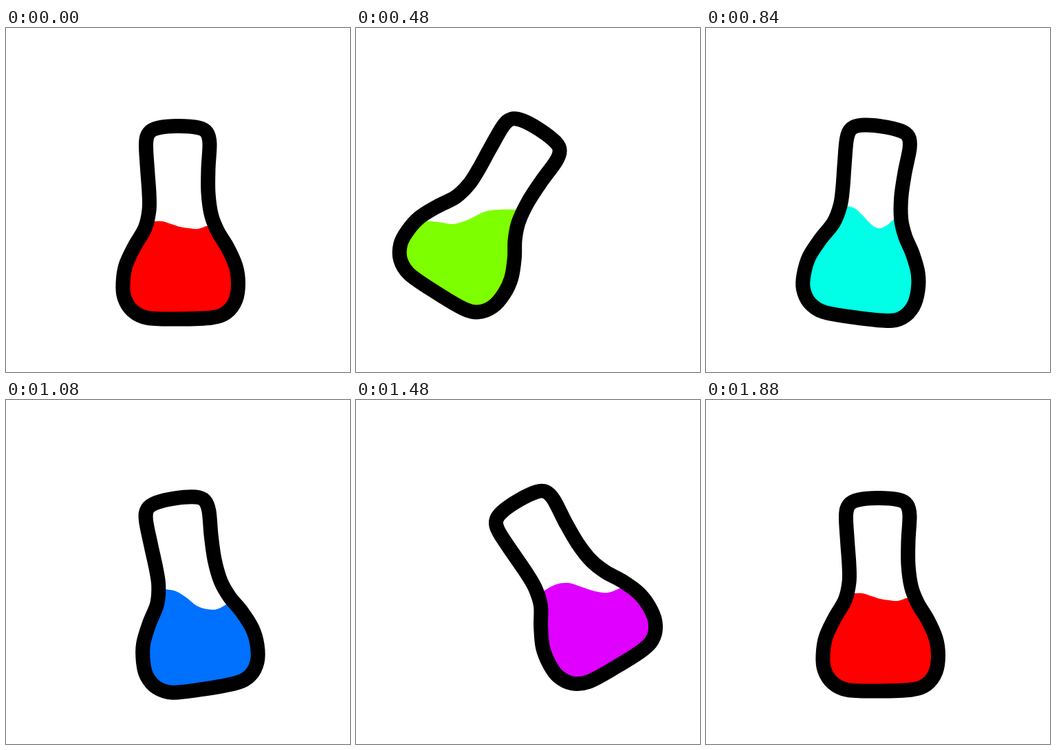
Recreate the animation shown at these times as an HTML page with a canvas. Size 500 by 500 pixels, loop 1920 ms.

```html
<!DOCTYPE html>
<html lang="en">
<head>
<meta charset="utf-8">
<title>Swinging flask</title>
<style>
  html, body { margin: 0; width: 100%; height: 100%; overflow: hidden; background: #fff; }
  canvas { display: block; width: 500px; height: 500px; }
</style>
</head>
<body>
<canvas id="stage" width="500" height="500"></canvas>
<script>
const ctx = document.getElementById('stage').getContext('2d');
const STEP = 40, STEPS = 48;
const PIVOT = { x: 250, y: 172 };

// Centre line of the glass, clockwise from the top left
const OUTLINE = [
  [222, 145], [250, 142.5], [280, 145], [292, 152], [296, 168], [294, 205],
  [294, 240], [298.5, 272], [308, 296], [322, 319], [334, 346], [337.5, 371],
  [334, 395], [321, 413], [299, 421], [250, 423], [206, 421.5], [184, 411],
  [172, 392], [170, 371], [174, 345], [187, 317], [202, 291], [208, 265],
  [208, 240], [205.5, 205], [203.5, 168], [208, 152]
];

// [step, degrees]
const SWING = [[0, 0], [12, 33], [36, -33], [42, -16.5], [47, 0]];

// [step, hue, left wall, right wall, surface heights from left to right]
const LIQUID = [
  [0, 0, 215, 291, 281, 281, 285, 289, 291, 292, 288],
  [6, 49, 167, 258, 288, 296, 305, 308, 303, 284, 272],
  [12, 90.5, 97, 232, 280, 282, 285, 278, 267, 264, 264],
  [21, 174, 205, 272, 259, 262, 272, 284, 291, 288, 279],
  [27, 213.7, 232, 322, 275, 278, 287, 299, 304, 304, 296],
  [37, 292.5, 272, 385, 278, 268, 266, 272, 278, 280, 273]
];
LIQUID.push([47, 360, ...LIQUID[0].slice(2)]);

function sample(keys, step) {
  const i = Math.max(1, keys.findIndex(k => k[0] >= step));
  const a = keys[i - 1], b = keys[i];
  const t = (step - a[0]) / (b[0] - a[0]);
  return a.slice(1).map((v, j) => v + (b[j + 1] - v) * t);
}

// Catmull-Rom spline as Bezier segments
function spline(path, pts, closed) {
  const n = pts.length;
  const at = i => closed ? pts[(i + n) % n] : pts[Math.min(n - 1, Math.max(0, i))];
  for (let i = 0; i < (closed ? n : n - 1); i++) {
    const [p, a, b, q] = [at(i - 1), at(i), at(i + 1), at(i + 2)];
    path.bezierCurveTo(
      a[0] + (b[0] - p[0]) / 6, a[1] + (b[1] - p[1]) / 6,
      b[0] - (q[0] - a[0]) / 6, b[1] - (q[1] - a[1]) / 6,
      b[0], b[1]);
  }
}

const glass = new Path2D();
glass.moveTo(...OUTLINE[0]);
spline(glass, OUTLINE, true);
glass.closePath();

function surface(left, right, heights) {
  const pts = heights.map((y, i) => [left + (right - left) * i / (heights.length - 1), y]);
  const path = new Path2D();
  path.moveTo(0, 500);
  path.lineTo(0, heights[0]);
  path.lineTo(...pts[0]);
  spline(path, pts, false);
  path.lineTo(500, heights[heights.length - 1]);
  path.lineTo(500, 500);
  path.closePath();
  return path;
}

function draw(step) {
  const [angle] = sample(SWING, step);
  const [hue, left, right, ...heights] = sample(LIQUID, step);
  const turned = new DOMMatrix()
    .translate(PIVOT.x, PIVOT.y).rotate(angle).translate(-PIVOT.x, -PIVOT.y);
  const flask = new Path2D();
  flask.addPath(glass, turned);

  ctx.fillStyle = '#fff';
  ctx.fillRect(0, 0, 500, 500);

  ctx.save();
  ctx.clip(flask);
  ctx.fillStyle = `hsl(${hue}, 100%, 50%)`;
  ctx.fill(surface(left, right, heights));
  ctx.restore();

  ctx.strokeStyle = '#000';
  ctx.lineWidth = 21;
  ctx.lineJoin = 'round';
  ctx.stroke(flask);
}

const start = performance.now();
function tick() {
  const time = Math.max(0, performance.now() - start);
  draw(Math.floor(time / STEP) % STEPS);
  requestAnimationFrame(tick);
}
tick();
</script>
</body>
</html>
```
